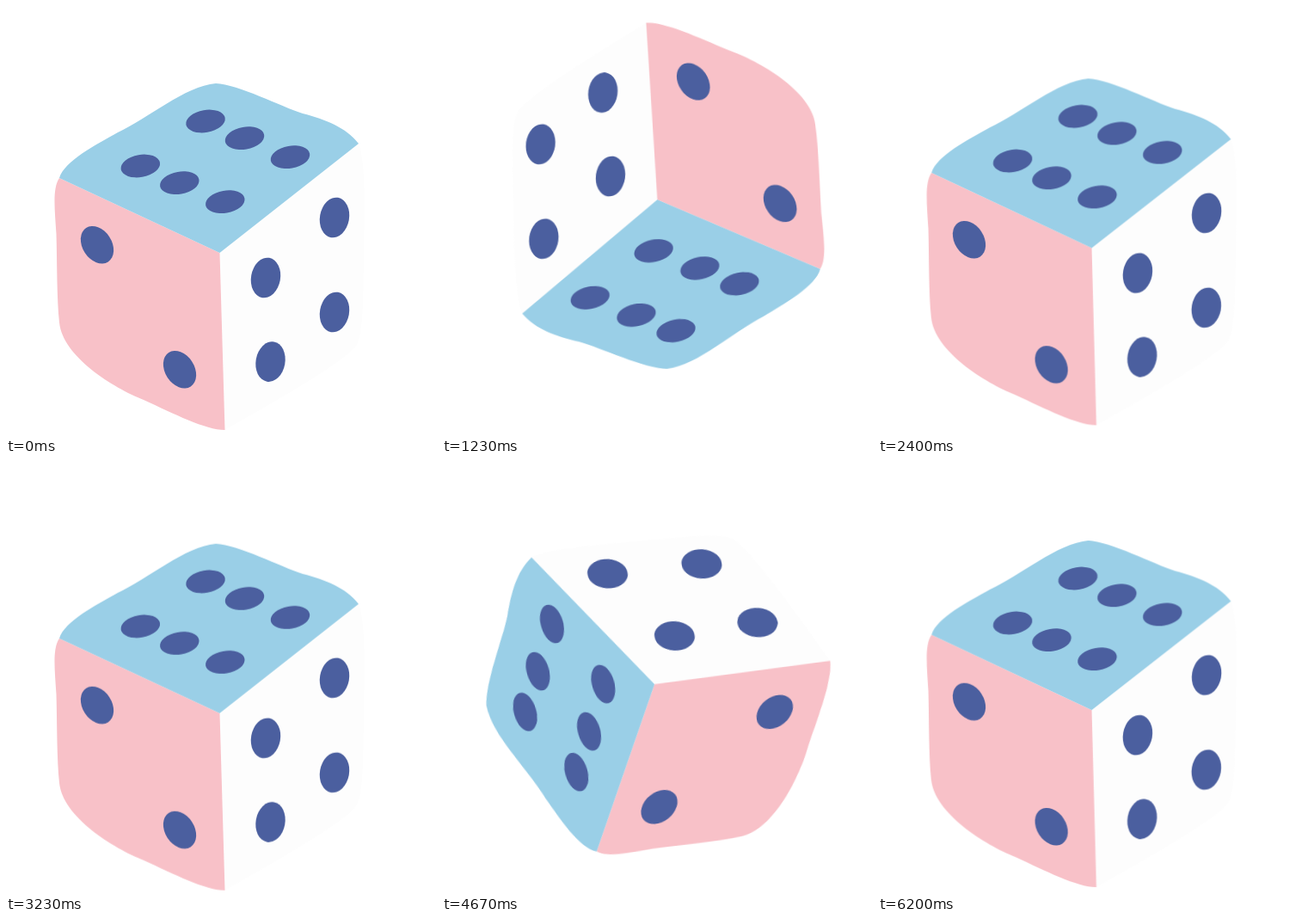
An HTML page for the animation above (6230 ms loop, 500x500 px).

```html
<!DOCTYPE html>
<html lang="en">
<head>
<meta charset="utf-8">
<title>Tossed die</title>
<style>
  html, body { margin: 0; width: 100%; height: 100%; overflow: hidden; background: #fff; }
  svg { display: block; width: 100%; height: 100%; }

  /* Paused: the script sets the time in whole steps. */
  #hop, #spin { animation: hop 3133ms linear infinite paused; }
  #spin { animation-name: spin; transform-origin: 249.4px 289.4px; }

  @keyframes hop {
    0% { transform: translateY(0); animation-timing-function: ease-out; }
    6.4% { transform: translateY(4px); animation-timing-function: cubic-bezier(.33, 0, .09, 1); }
    31.9% { transform: translateY(-79px); animation-timing-function: ease-in-out; }
    53.2% { transform: translateY(-30.5px); animation-timing-function: ease-in-out; }
    85.1% { transform: translateY(-1.3px); }
    95.7% { transform: translateY(-1.3px); animation-timing-function: ease-in; }
    100% { transform: translateY(0); }
  }
  @keyframes spin {
    0%, 14.9% { transform: rotate(0deg); animation-timing-function: cubic-bezier(.32, 0, .29, 1); }
    85.1% { transform: rotate(364deg); animation-timing-function: ease-in-out; }
    100% { transform: rotate(360deg); }
  }
</style>
</head>
<body>
<svg viewBox="0 0 500 500">
  <g id="hop"><g id="spin">
    <path fill="#fdfdfd" d="M410 160C418 180 417 230 416 290C415 340 416 375 408 394
      C395 414 300 467 254.5 493L248.5 287Z"/>
    <path fill="#f8c1c8" d="M62 200C54 212 56.5 235 58.5 265C59.5 300 59 340 62 368
      C66 408 125 444 160 458C195 474 232 493 254.5 493L248.5 287Z"/>
    <path fill="#9acfe7" d="M62 200C68 180 105 161 130 147C165 131 208 93 244 90
      C270 91 320 117 345 125C372 132 395 141 410 160L248.5 287Z"/>
    <g id="pips" fill="#4b5f9f"></g>
  </g></g>
</svg>
<script>
const LOOP = 6230, FRAMES = 187, TOSS = 94, STEP_MS = 1000 / 30;

function addPips(points, rx, ry, tilt) {
  for (const [x, y] of points) {
    const pip = document.createElementNS('http://www.w3.org/2000/svg', 'ellipse');
    pip.setAttribute('rx', rx);
    pip.setAttribute('ry', ry);
    pip.setAttribute('transform', `translate(${x} ${y}) rotate(${tilt})`);
    document.getElementById('pips').appendChild(pip);
  }
}

const row = [[232, 134], [277.5, 153.7], [330.5, 175.7]];
addPips(row, 23, 13, -10);
addPips(row.map(([x, y]) => [x - 75.7, y + 52]), 23, 13, -10);
addPips([[106, 277.7], [202, 422.7]], 17, 23.5, -33);
addPips([[382, 246], [302, 316], [382, 356], [307.5, 413.6]], 17, 23.5, 10);

// Two tosses per loop: the first drops every third step, the second plays them all.
function stepAt(ms) {
  const n = Math.floor((ms + 5) * FRAMES / LOOP) % FRAMES;
  if (n >= TOSS) return n - TOSS;
  return n % 3 === 2 ? n - 1 : n;
}

const moves = document.getAnimations();
const start = performance.now();
function draw() {
  const step = stepAt((performance.now() - start) % LOOP);
  for (const move of moves) move.currentTime = step * STEP_MS;
  requestAnimationFrame(draw);
}
draw();
</script>
</body>
</html>
```
